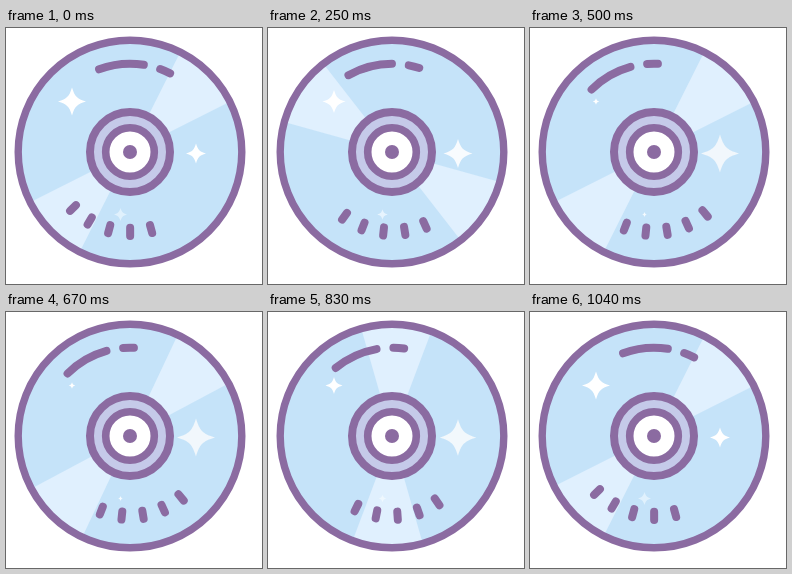
Animation of 256x256 px, one loop 1.18 s. Source, as an HTML page:

```html
<!DOCTYPE html>
<html lang="en">
<head>
<meta charset="utf-8">
<title>Spinning disc</title>
<style>
  html, body { margin: 0; width: 100%; height: 100%; overflow: hidden; background: #fff; }
  svg { display: block; width: 100vw; height: 100vh; }
</style>
</head>
<body>
<svg viewBox="0 0 256 256">
  <defs>
    <path id="star" d="M0-1C.2-.35 .35-.2 1 0C.35 .2 .2 .35 0 1C-.2 .35-.35 .2-1 0C-.35-.2-.2-.35 0-1Z"/>
  </defs>
  <g transform="translate(124 124)">
    <circle r="112" fill="#c5e3f9"/>
    <g id="shine" fill="#e0f0fe"></g>
    <circle r="111.8" fill="none" stroke="#8b6ba1" stroke-width="7.4"/>
    <g id="marks" fill="none" stroke="#8b6ba1" stroke-width="8" stroke-linecap="round"></g>
    <circle r="40" fill="#c5cae9" stroke="#8b6ba1" stroke-width="8"/>
    <circle r="24.3" fill="#fff" stroke="#8b6ba1" stroke-width="7.6"/>
    <circle r="7" fill="#8b6ba1"/>
  </g>
  <g id="stars"></g>
</svg>
<script>
const LOOP = 1180, LAST = 22;
const byId = id => document.getElementById(id);

function add(parent, tag, attrs) {
  const node = document.createElementNS("http://www.w3.org/2000/svg", tag);
  for (const key in attrs) node.setAttribute(key, attrs[key]);
  parent.append(node);
  return node;
}

// Angles are counterclockwise degrees from the right.
function polar(radius, degrees) {
  const a = degrees * Math.PI / 180;
  return `${(radius * Math.cos(a)).toFixed(2)} ${(-radius * Math.sin(a)).toFixed(2)}`;
}

const arc = (r, from, to) => `${polar(r, from)}A${r} ${r} 0 0 1 ${polar(r, to)}`;

const shine = byId("shine"), marks = byId("marks");
for (const middle of [45, 225])
  add(shine, "path", { d: `M0 0L${arc(110, middle + 18.3, middle - 18.3)}Z` });

for (const [from, to] of [[110.5, 81], [70, 63]])
  add(marks, "path", { d: "M" + arc(88.3, from, to) });
for (let i = 0; i < 5; i++) {
  const angle = 224.5 + i * 15.2;
  add(marks, "path", { d: `M${polar(75.8, angle)}L${polar(84, angle)}` });
}

// Each star swings between two sizes and tints over a number of steps.
const stars = [
  { x: 66, y: 73.5, size: [14, 3], tint: [[255, 255, 255], [255, 255, 255]], steps: 10 },
  { x: 190, y: 125.5, size: [10, 19], tint: [[255, 255, 255], [241, 247, 252]], steps: 6 },
  { x: 114.5, y: 186.5, size: [6.5, 2.5], tint: [[224, 241, 253], [246, 251, 255]], steps: 8 }
];
for (const star of stars) star.node = add(byId("stars"), "use", { href: "#star" });

const mix = (a, b, p) => a + (b - a) * p;
const clamp = v => Math.min(1, Math.max(0, v));
const smooth = v => (v = clamp(v), v * v * (3 - 2 * v));

// Cubic Bezier (.4, 0, .2, 1), solved by bisection.
function ease(v) {
  v = clamp(v);
  let low = 0, high = 1;
  for (let i = 0; i < 24; i++) {
    const s = (low + high) / 2, r = 1 - s;
    if (3 * r * r * s * .4 + 3 * r * s * s * .2 + s * s * s < v) low = s;
    else high = s;
  }
  return low * low * (3 - 2 * low);
}

// Steps run at about 24 per second, rounded to 10 ms.
function stepAt(time) {
  let step = 0, end = 170;
  while (time >= end && step < LAST) {
    step++;
    end += step % 6 === 5 ? 50 : 40;
  }
  return step;
}

function draw(time) {
  const step = stepAt(time);
  const swing = Math.min(step, LAST - step);
  const shineSteps = step < 11 ? 9.2 : 10.2;
  shine.setAttribute("transform", `rotate(${180 * ease(swing / shineSteps)})`);
  marks.setAttribute("transform", `rotate(${-24.6 * ease(swing / 10)})`);
  for (const { node, x, y, size, tint, steps } of stars) {
    const p = smooth(swing / steps);
    const rgb = tint[0].map((c, i) => Math.round(mix(c, tint[1][i], p)));
    node.setAttribute("transform", `translate(${x} ${y}) scale(${mix(size[0], size[1], p)})`);
    node.setAttribute("fill", `rgb(${rgb})`);
  }
}

const start = performance.now();
function tick() {
  draw((performance.now() - start) % LOOP);
  requestAnimationFrame(tick);
}
tick();
</script>
</body>
</html>
```
